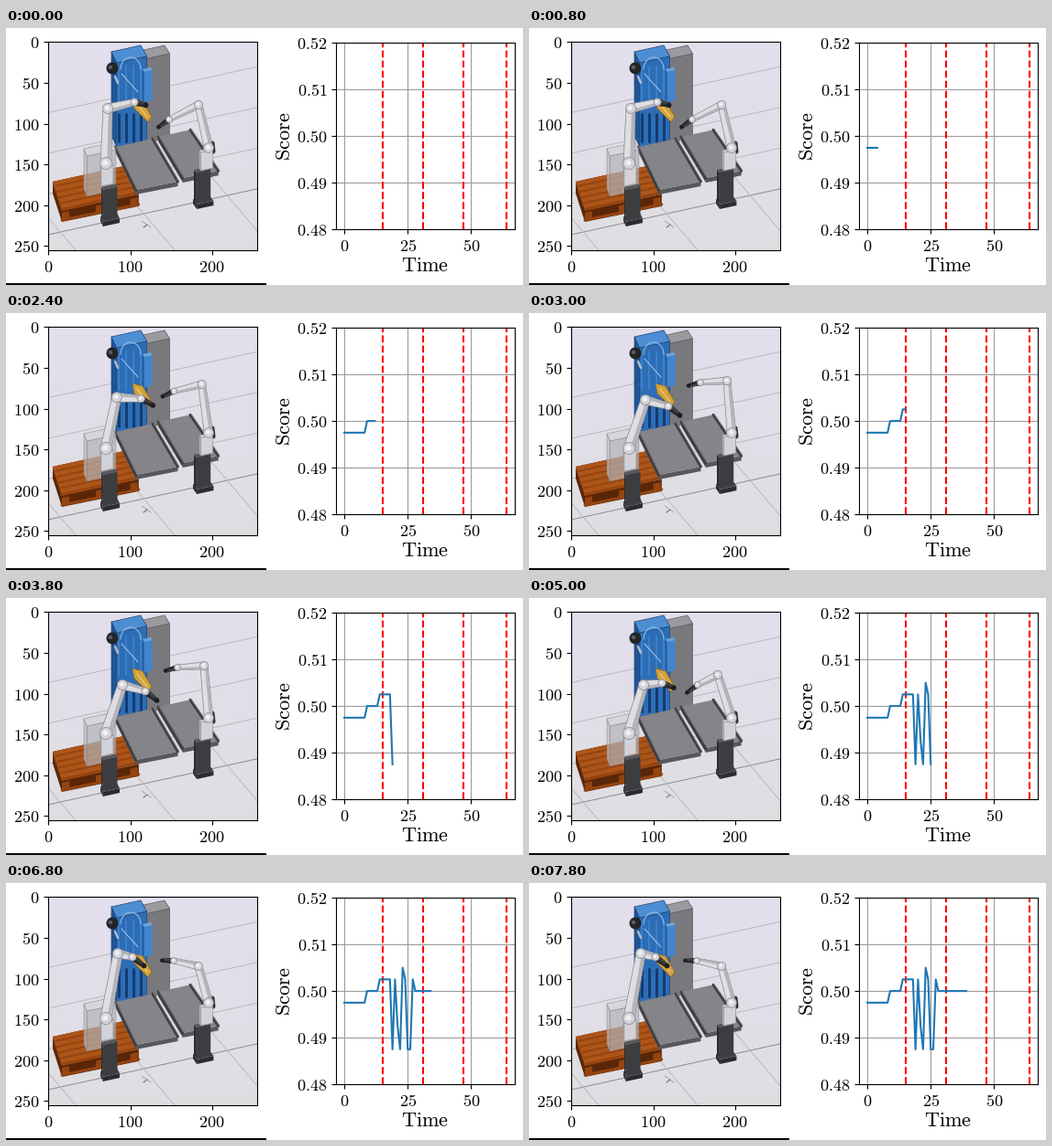
A matplotlib script that plays this animation: 564 by 281 pixels, repeating every 8 s.

```python
import numpy as np
import matplotlib.pyplot as plt
from matplotlib.animation import FuncAnimation
from matplotlib.patches import Circle, Polygon, Rectangle

W, H, DPI = 564, 281, 100
FRAMES, STEP = 40, 200
PX = 72 / DPI  # points per pixel
SLOPE = np.array([1, -.22])  # screen direction of the scene's long axis

plt.rcParams.update({"mathtext.fontset": "cm", "xtick.labelsize": 13,
                     "ytick.labelsize": 13})
fig = plt.figure(figsize=(W / DPI, H / DPI), dpi=DPI, facecolor="white")


def add_axes(left, top, width, height):
    return fig.add_axes([left / W, 1 - (top + height) / H,
                         width / W, height / H])


def label(x, y, word, **kw):
    fig.text(x / W, 1 - y / H, rf"$\mathrm{{{word}}}$", size=16,
             ha="center", va="center", **kw)


# ---- camera view, drawn in stage pixels ----
LEFT, TOP, SIDE = 46, 15, 228
cam = add_axes(LEFT, TOP, SIDE, SIDE)
cam.set_xlim(LEFT, LEFT + SIDE)
cam.set_ylim(TOP + SIDE, TOP)


def ticks(start, step):
    values = range(0, 256, step)
    return ([start + (v + .5) * SIDE / 256 for v in values],
            [f"${v}$" for v in values])


cam.set_xticks(*ticks(LEFT, 100))
cam.set_yticks(*ticks(TOP, 50))


def poly(pts, color, edge="none", alpha=None):
    return cam.add_patch(Polygon(pts, fc=color, ec=edge, lw=.7 * PX,
                                 alpha=alpha, joinstyle="round"))


def stroke(a, b, color, lw=1):
    cam.plot(*zip(a, b), color=color, lw=lw * PX, zorder=1,
             solid_capstyle="round")


def disc(x, y, r, color, edge="none"):
    return cam.add_patch(Circle((x, y), r, fc=color, ec=edge, lw=.7 * PX))


def inward(x, depth):
    """Step towards the viewer; it leans more on the right of the view."""
    return np.array([(.2 + .0024 * x) * depth, depth])


def box(x, y, w, d, h, top, front, side, edge="none", alpha=None):
    """Box whose top face has its far left corner at (x, y)."""
    a = np.array([x, y])
    b = a + w * SLOPE
    c, e = b + inward(b[0], d), a + inward(x, d)
    down = np.array([0, h])
    poly([a, e, e + down, a + down], side, edge, alpha)
    poly([e, c, c + down, e + down], front, edge, alpha)
    poly([a, b, c, e], top, edge, alpha)
    return a, b, c, e


def draw_floor():
    fade = np.linspace([.893, .872, .930], [.873, .873, .885], 64)
    cam.imshow(fade[:, None], extent=(LEFT, LEFT + SIDE, TOP + SIDE, TOP),
               aspect="auto", zorder=0, interpolation="bilinear")
    for i in range(4):
        start = np.array([LEFT, 226 - 44.5 * i])
        stroke(start, start + SIDE * SLOPE, "#b9b9c0" if i else "#8c8c92")
        foot = np.array([76 + 108 * i, TOP + SIDE])
        stroke(foot, foot - (77, 91), "#b9b9c0")
    stroke((148, 211), (158, 218), "#a6a6ac")
    stroke((150, 218), (154, 215), "#77777d", 1.2)


def draw_machine():
    box(141, 26, 32, 9, 92, "#9b9a9e", "#79787c", "#68686d", "#5c5c60")
    box(115, 26, 32, 12, 92, "#4d8ed2", "#2c6db6", "#1f5596", "#1c4478")
    box(149, 45, 9, 3, 33, "#6aa4dc", "#4285cc", "#235a9b")
    for x in range(123, 153, 8):
        stroke((x, 42), (x, 84), "#3b80c8", 2)
        stroke((x, 94), (x, 124), "#143b70", 3)
    t = np.linspace(0, np.pi, 20)
    cam.plot(136 + 11 * np.cos(t), 45 - 13 * np.sin(t), color="#9cc2e6",
             lw=PX, zorder=1)
    stroke((126, 50), (144, 70), "#a9c9e8")
    # side camera
    disc(116, 44, 6.5, "#222428")
    disc(114, 43, 2.2, "#5a5d64")
    stroke((119, 53), (122, 60), "#b9bcc4", 2.4)
    # golden fixture
    poly([(138, 77), (149, 80), (159, 97), (155, 103), (140, 88)],
         "#d3a23c", "#8a6420")
    stroke((143, 83), (154, 97), "#ecc873", 1.4)


def draw_pallet():
    x, y, w, d = 51, 168, 78, 31
    _, _, right, near = box(x, y, w, d, 13, *["#5a2608"] * 3)
    for t in np.arange(5) / 5:
        px, py = (x, y) + t * inward(x, d)
        box(px, py, w + t * 5, 4.4, 3, "#ad5519", "#984510", "#7f390d")
    for t in (0, .44, .89):
        px, py = near + t * (right - near)
        box(px, py + 3, 8, 0, 9, *["#94440f"] * 3)
    drop = np.array([0, 11])
    stroke(near + drop, right + drop, "#94440f", 3)


def draw_table():
    for x, y, w, d in [(119, 130, 41, 47), (166, 119, 35, 45)]:
        a, b, c, e = box(x, y, w, d, 5, "#858488", "#58585c", "#4b4b4f")
        for p, q in [(a, e), (b, c)]:
            stroke(p, q, "#3c3d41", 3)
            stroke(p + (.8, -1), q + (.8, -1), "#7d7d81", .9)


def draw_stand(x, y):
    box(x - 10, y + 32, 18, 6, 5, "#3f4145", "#2b2c30", "#2b2c30")
    box(x - 9, y, 16, 3, 33, "#55575c", "#3b3d41", "#2a2b2f")


def smooth(t):
    t = np.clip(t, 0, 1)
    return t * t * (3 - 2 * t)


class Arm:
    """White two-link arm with a dark tool that follows the wrist."""

    def __init__(self, shoulder, elbows, wrists, drop, size):
        self.shoulder = np.array(shoulder, float)
        self.poses = np.stack([elbows, wrists], axis=1).astype(float)
        self.drop = np.array([0, drop])
        self.widths = np.array([12, 10, 7, 4]) * size
        self.links = [(poly(np.zeros((3, 2)), fill, edge),
                       poly(np.zeros((3, 2)), shade))
                      for fill, shade, edge in
                      [("#dedee3", "#b3b3ba", "#85858c")] * 2
                      + [("#2c2d31", "#45464b", "#1d1e22")]]
        self.joints = [(disc(0, 0, w / 2 + .6, "#d3d3d9", "#85858c"),
                        disc(0, 0, w / 4, "#f1f1f4"))
                       for w in self.widths[:3]]
        self.tip = disc(0, 0, self.widths[3] * .7, "#1d1e22")

    def pose(self, n):
        pose = self.poses[0]
        for (begin, end), target in zip(MOVES, self.poses[1:]):
            pose = pose + (target - pose) * smooth((n - begin) / (end - begin))
        elbow, wrist = pose
        reach = (wrist - elbow) / np.hypot(*(wrist - elbow))
        return [self.shoulder, elbow, wrist, wrist + 13 * (reach + self.drop)]

    def move(self, n):
        pts = self.pose(n)
        for i, (body, shade) in enumerate(self.links):
            p, q = pts[i], pts[i + 1]
            d = (q - p) / np.hypot(*(q - p))
            side = np.array([-d[1], d[0]]) * (1 if d[1] < 0 else -1)
            a, b = side * self.widths[i] / 2, side * self.widths[i + 1] / 2
            body.set_xy([p - a, q - b, q + b, p + a])
            shade.set_xy([p + a * .2, q + b * .2, q + b * .9, p + a * .9])
        for p, (ring, dot) in zip(pts, self.joints):
            ring.center, dot.center = p, p - .6
        self.tip.center = pts[3]


MOVES = [(8, 15), (19, 25), (25, 34)]  # start and end of each change of pose

draw_floor()
draw_machine()
draw_pallet()
draw_table()
box(85, 132, 31, 8, 44, "#d3d3d7", "#b2b2b7", "#bcbcc1", "#85858b", .7)
for foot in [(113, 174), (214, 155)]:
    draw_stand(*foot)
stroke((225, 126), (226, 135), "#2f3035", 5)
for x, y in [(103, 151), (211, 134)]:
    box(x, y, 13, 2, 20, "#dcdce1", "#d2d2d8", "#b7b7be", "#97979d")

right_arm = Arm((221, 131), [(210, 84), (216, 74), (206, 84), (210, 91)],
                [(178, 100), (187, 76), (184, 95), (183, 85)], .2, .8)
left_arm = Arm((109, 148), [(111, 88), (127, 95), (125, 95), (122, 77)],
               [(140, 81), (152, 102), (145, 93), (138, 81)], .5, 1)

# ---- score chart ----
chart = add_axes(360.2, 16.1, 194.8, 204)
chart.set_xlim(-3.2, 67.2)
chart.set_ylim(.48, .52)
chart.set_xticks([0, 25, 50], ["$0$", "$25$", "$50$"])
levels = np.linspace(.48, .52, 5)
chart.set_yticks(levels, [f"${v:.2f}$" for v in levels])
chart.grid(color="#9c9c9c", lw=.8)
for x in (15, 31, 47, 64):
    chart.axvline(x, color="red", ls="--", lw=1.5)
label(303.5, 118.3, "Score", rotation=90)
label(457, 259.5, "Time")

# score in steps of 0.0025 around one half: a climb, a burst, then rest
climb = np.repeat([-1, 0, 1], [9, 5, 5])
burst = [-5, 1, -3, -5, 2, 1, -5, -5, 1]
score = .5 + .0025 * np.concatenate([climb, burst, np.zeros(12)])
curve, = chart.plot([], [], color="#1f77b4", lw=1.5)

# black rule under the camera view
fig.add_artist(Rectangle((0, 0), 284 / W, 2 / H, fc="black", ec="none"))


def update(n):
    left_arm.move(n)
    right_arm.move(n)
    curve.set_data(np.arange(n + 1), score[:n + 1])
    return []


anim = FuncAnimation(fig, update, frames=FRAMES, interval=STEP,
                     init_func=lambda: update(0), repeat=True, repeat_delay=0)
plt.show()
```
